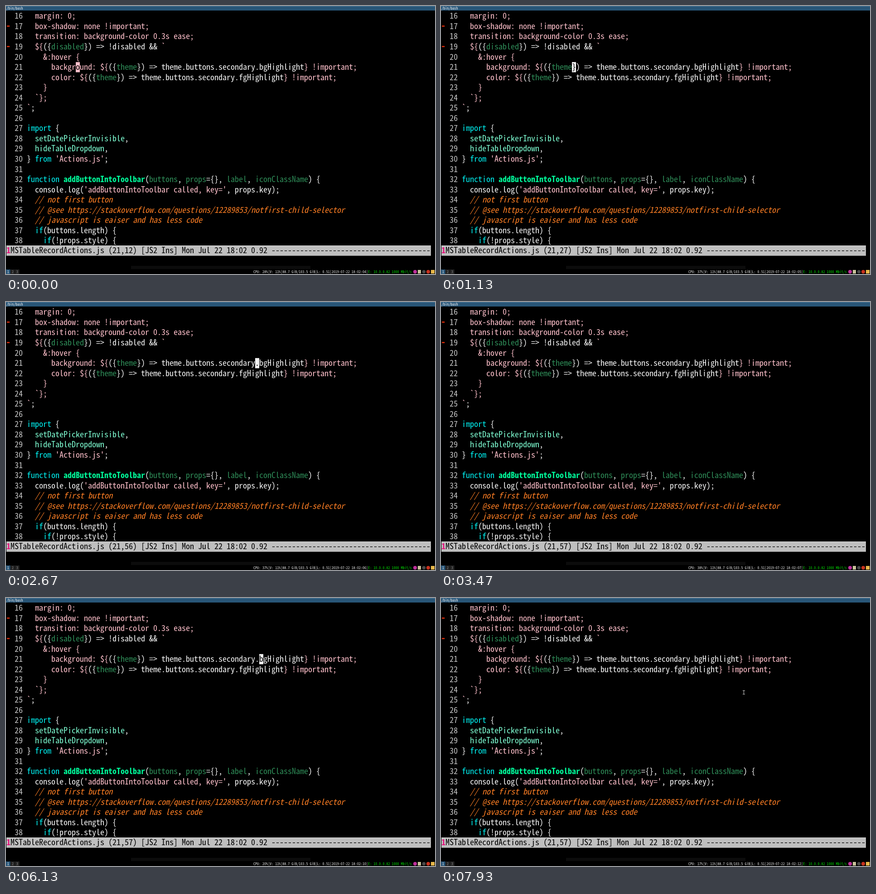
These frames come from a looping animation (947x592 px, 8000 ms). An HTML page with a canvas:

```html
<!DOCTYPE html>
<html lang="en">
<head>
<meta charset="utf-8">
<title>Editor session</title>
<style>
  html, body { margin: 0; width: 100%; height: 100%; overflow: hidden; background: #000; }
  canvas { display: block; width: 947px; height: 592px; }
</style>
</head>
<body>
<canvas id="stage" width="947" height="592"></canvas>
<script>
const ctx = document.getElementById("stage").getContext("2d");
const LOOP = 8000;
const FAMILY = '"Noto Sans Mono CJK JP", "Noto Sans Mono CJK SC", "Noto Sans Mono", "DejaVu Sans Mono", monospace';

// Terminal grid
const LEFT = 1, CELL = 9, ROW = 22.55, BASE = 28.3, CODE_COL = 5, FIRST_LINE = 16;
const SMALL_CELL = 4.02;

const STYLES = {
  w: { color: "#f5f5f5" },
  p: { color: "#ffc0cb" },
  g: { color: "#2e8b57" },
  k: { color: "#00f0f0" },
  v: { color: "#7fffd4" },
  f: { color: "#00fa9a", font: "bold" },
  c: { color: "#ff7f24", font: "italic" }
};

// "~x" switches to style x
const CODE = [
  "~p  margin: 0;",
  "~p  box-shadow: none !important;",
  "~p  transition: background-color 0.3s ease;",
  "~p  ${~w({~gdisabled~w}) => !disabled && ~p`",
  "~p    &:hover {",
  "~p      background: ${~w({~gtheme~w}) => theme.buttons.secondary.bgHighlight~p} !important;",
  "~p      color: ${~w({~gtheme~w}) => theme.buttons.secondary.fgHighlight~p} !important;",
  "~p    }",
  "~p  `};",
  "~p`~w;",
  "",
  "~kimport~w {",
  "~v  setDatePickerInvisible~w,",
  "~v  hideTableDropdown~w,",
  "~w} ~kfrom~p 'Actions.js'~w;",
  "",
  "~kfunction ~faddButtonIntoToolbar~w(~gbuttons~w, ~gprops~w={}, ~glabel~w, ~giconClassName~w) {",
  "~w  console.log(~p'addButtonIntoToolbar called, key='~w, props.key);",
  "~c  // not first button",
  "~c  // @see https://stackoverflow.com/questions/12289853/notfirst-child-selector",
  "~c  // javascript is eaiser and has less code",
  "~k  if~w(buttons.length) {",
  "~k    if~w(!props.style) {"
].map(parseRuns);

// Word-wise cursor moves on line 21: [time, column]
const CURSOR_LINE = 21;
const MOVES = [
  [0, 12], [380, 16], [580, 18], [780, 22], [975, 27], [1170, 30], [1370, 33],
  [1570, 38], [1765, 39], [1930, 46], [2130, 47], [2470, 56], [2950, 57]
];
const BLINK_START = 3450, BLINK = 500;

// Pointer: [time, x, y]
const POINTER = [[4500, 575, 146], [4730, 581, 143], [6130, 635, 134], [7900, 668.5, 208.5]];

const CPU = [28, 37, 37, 38, 38, 28, 20, 18, 17];
const CLOCK_LEAD = 130;

function parseRuns(line) {
  let col = 0;
  return line.split("~").slice(1).map(part => {
    const run = { style: STYLES[part[0]], text: part.slice(1), col };
    col += run.text.length;
    return run;
  });
}

// Font size whose advance fills one cell
function sizeFor(cell) {
  ctx.font = `100px ${FAMILY}`;
  return cell * 100 / ctx.measureText("0").width;
}
const SIZE = sizeFor(CELL), SMALL = sizeFor(SMALL_CELL);

function rect(x, y, w, h, color) {
  ctx.fillStyle = color;
  ctx.fillRect(x, y, w, h);
}

function dot(x, y, r, color) {
  ctx.fillStyle = color;
  ctx.beginPath();
  ctx.arc(x, y, r, 0, Math.PI * 2);
  ctx.fill();
}

function write(text, x, y, color, size, font = "") {
  ctx.font = `${font} ${size}px ${FAMILY}`;
  ctx.fillStyle = color;
  ctx.fillText(text, x, y);
}

const colX = col => LEFT + col * CELL;
const lineY = line => BASE + (line - FIRST_LINE) * ROW;
const lastAt = (list, t) => list.filter(item => item[0] <= t).pop();

function drawTitle() {
  rect(0, 0, 947, 10, "#285577");
  rect(0, 0, 947, 1, "#4c7899");
  write("/bin/bash", 1, 7.8, "#fff", SMALL);
}

function drawCode() {
  CODE.forEach((runs, i) => {
    const line = FIRST_LINE + i, y = lineY(line);
    write(String(line), colX(2), y, "#c4c4c4", SIZE);
    for (const { style, text, col } of runs) {
      write(text, colX(CODE_COL + col), y, style.color, SIZE, style.font);
    }
  });
  for (const line of [17, 19]) rect(2, lineY(line) - 7.6, 6, 2.4, "#e8300c");
}

function drawCursor(t, col) {
  if (t >= BLINK_START && Math.floor((t - BLINK_START) / BLINK) % 2 === 0) return;
  const run = CODE[CURSOR_LINE - FIRST_LINE].find(r => col < r.col + r.text.length);
  const x = colX(CODE_COL + col), y = lineY(CURSOR_LINE);
  rect(x, y - 17.2, CELL, 22.5, run.style.color);
  write(run.text[col - run.col], x, y, "#000", SIZE);
}

function drawModeLine(col) {
  const y = 546.4;
  rect(1, 529, 937, 23, "#bfbfbf");
  rect(1, 529, 937, 1, "#dcdcdc");
  rect(1, 551, 937, 1, "#8c8c8c");
  write("1", colX(0), y, "#e5127d", SIZE, "bold");
  const info = `MSTableRecordActions.js (${CURSOR_LINE},${col}) [JS2 Ins] Mon Jul 22 18:02 0.92 `;
  write(info + "-".repeat(39), colX(1), y, "#000", SIZE);
}

function drawBar(t) {
  const y = 589.6;
  rect(276, 574, 396, 7, "#0c0c0c");
  ["1", "2", "3"].forEach((name, i) => {
    const active = i === 0;
    rect(i * 10, 582, 9.5, 10, active ? "#285577" : "#222");
    write(name, i * 10 + 2.8, y, active ? "#fff" : "#888", SMALL);
  });

  const tick = Math.floor((t + CLOCK_LEAD) / 1000);
  const clock = "18:02:" + String(4 + tick).padStart(2, "0");
  const info = `CPU: ${CPU[tick]}%|V: 11%|88.7 GiB/103.5 GiB|L: 0.51|2019-07-22 ${clock}|`;
  write(info, 546, y, "#f0f0f0", SMALL);
  write("E: 10.0.0.82 1000 Mbit/s", 546 + info.length * SMALL_CELL, y, "#00e000", SMALL);

  dot(903, 587, 4, "#c0309c");
  rect(909, 583, 7, 8, "#c9c29a");
  dot(922.5, 587, 3.8, "#4a4a4a");
  dot(932, 587, 4, "#c8321e");
  rect(938, 583, 8, 8, "#e9b84a");
}

function drawPointer(t) {
  if (t < POINTER[0][0]) return;
  const from = lastAt(POINTER, t);
  const to = POINTER[POINTER.indexOf(from) + 1] || from;
  const u = to === from ? 0 : (t - from[0]) / (to[0] - from[0]);
  const ease = u * u * (3 - 2 * u);
  const x = from[1] + (to[1] - from[1]) * ease;
  const y = from[2] + (to[2] - from[2]) * ease;
  for (const [width, color] of [[2.4, "#000"], [1, "#c8c8c8"]]) {
    ctx.strokeStyle = color;
    ctx.lineWidth = width;
    ctx.beginPath();
    ctx.moveTo(x - 2.5, y - 4);
    ctx.lineTo(x + 2.5, y - 4);
    ctx.moveTo(x, y - 4);
    ctx.lineTo(x, y + 4);
    ctx.moveTo(x - 2.5, y + 4);
    ctx.lineTo(x + 2.5, y + 4);
    ctx.stroke();
  }
}

function draw() {
  const t = performance.now() % LOOP;
  const col = lastAt(MOVES, t)[1];
  rect(0, 0, 947, 592, "#000");
  drawTitle();
  drawCode();
  drawCursor(t, col);
  drawModeLine(col);
  drawBar(t);
  drawPointer(t);
  requestAnimationFrame(draw);
}
draw();
</script>
</body>
</html>
```
